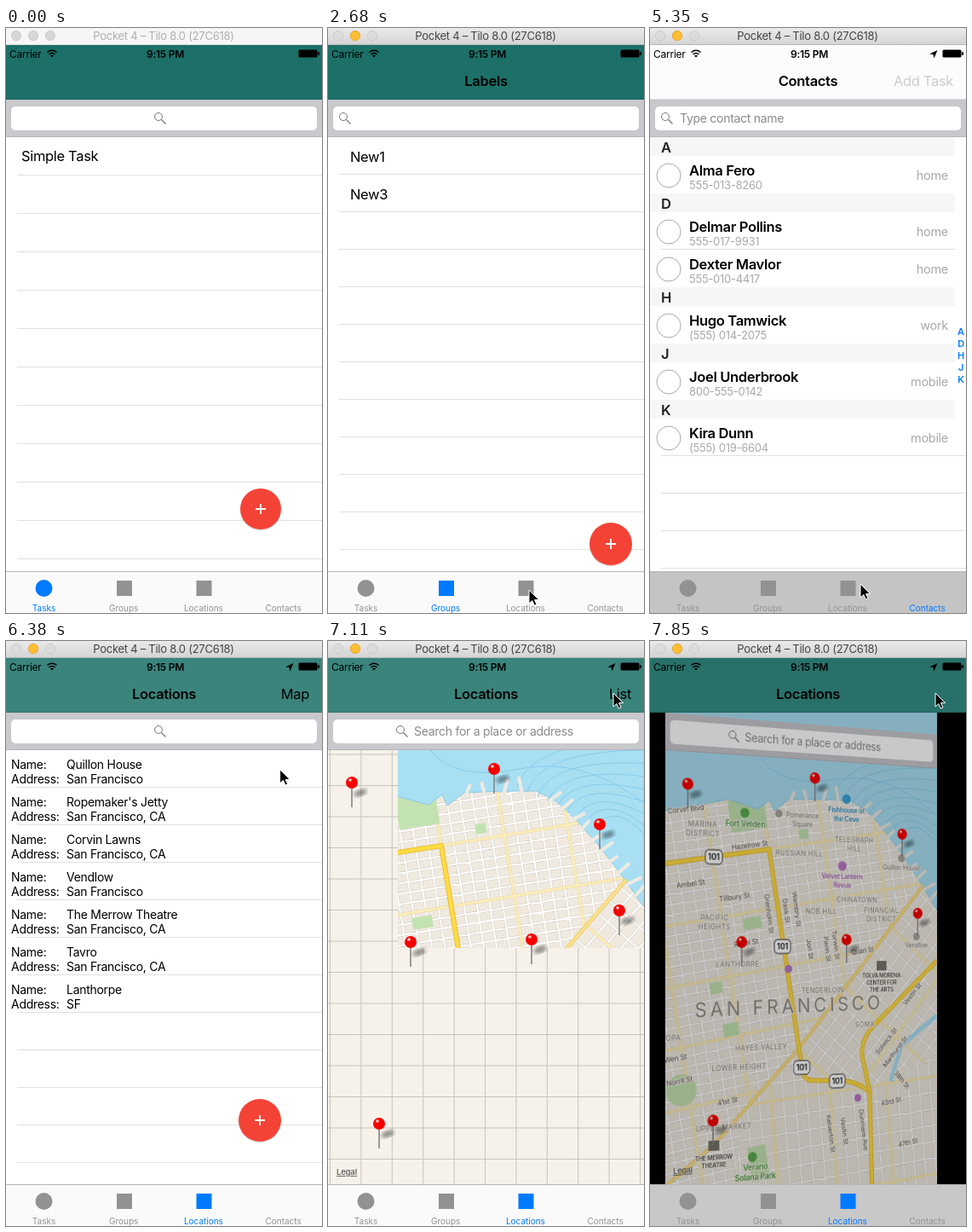
These frames come from a looping animation (371x686 px, 7990 ms). An HTML page:

```html
<!DOCTYPE html>
<html lang="en">
<head>
<meta charset="utf-8">
<title>Task app walkthrough</title>
<style>
  html, body { margin: 0; width: 100%; height: 100%; overflow: hidden; background: #000; }
  svg { position: absolute; left: 0; top: 0; width: 371px; height: 686px; transform-origin: 185.5px 353px; }
  text { font-family: Inter, "Open Sans", sans-serif; letter-spacing: -.02em; white-space: pre; }
</style>
</head>
<body>
<script>
const W = 371, H = 686, LOOP = 7990, TICK = 148;
const BLUE = '#007aff', GREY = '#929292';

const times = (n, f) => Array.from({ length: n }, (_, i) => f(i)).join('');
const rect = (x, y, w, h, fill, extra = '') =>
  `<rect x="${x}" y="${y}" width="${w}" height="${h}" fill="${fill}" ${extra}/>`;
const circle = (x, y, r, fill, extra = '') => `<circle cx="${x}" cy="${y}" r="${r}" fill="${fill}" ${extra}/>`;
const line = (d, color, width = 1, extra = '') =>
  `<path d="${d}" fill="none" stroke="${color}" stroke-width="${width}" ${extra}/>`;
const text = (s, x, y, size = 16.5, fill = '#000', extra = '') =>
  `<text x="${x}" y="${y}" font-size="${size}" fill="${fill}" ${extra}>${s}</text>`;
const BOLD = 'font-weight="600"', MID = 'text-anchor="middle"', END = 'text-anchor="end"';

// ---- shared parts ----
const rules = (first, step, n) =>
  times(n, i => rect(13, first + i * step, W - 13, 1, '#e0e0e2'));

const searchBar = (iconX, hint = '', hintX = 0) =>
  rect(0, 84, W, 44, '#c8c8cd') + rect(0, 127, W, 1, '#b4b4b9') + rect(6, 92, 359, 28, '#fff', 'rx="5"') +
  circle(iconX - 2, 104, 4.5, 'none', 'stroke="#77777c"') +
  line(`M${iconX + 1.5} 107.5l5 5`, '#77777c', 1.3) +
  text(hint, hintX, 111, 14, '#8a8a8f');

const addButton = (x, y, r) =>
  circle(x, y + 1.5, r, '#000', 'opacity=".12"') + circle(x, y, r, '#f44336') +
  line(`M${x - 6} ${y}h12M${x} ${y - 6}v12`, '#fff', 1.8);

// ---- list pages ----
const tasksPage = rect(0, 0, W, H, '#fff') + rules(172, 45, 11) + searchBar(181) +
  text('Simple Task', 18, 156) + addButton(299, 564, 24);

const groupsPage = rect(0, 0, W, H, '#fff') + rules(171, 44, 11) + searchBar(20) +
  text('New1', 26, 157) + text('New3', 26, 201) + addButton(332, 605, 25);

const places = [
  ['Quillon House', 'San Francisco'], ["Ropemaker's Jetty", 'San Francisco, CA'],
  ['Corvin Lawns', 'San Francisco, CA'], ['Vendlow', 'San Francisco'],
  ['The Merrow Theatre', 'San Francisco, CA'], ['Tavro', 'San Francisco, CA'], ['Lanthorpe', 'SF']
];
const locationsPage = rect(0, 0, W, H, '#fff') + rules(171, 44, 11) + searchBar(181) +
  places.map(([name, address], i) => {
    const y = 150 + i * 44;
    return text('Name:', 6, y, 14) + text(name, 71, y, 14) +
      text('Address:', 6, y + 17, 14) + text(address, 71, y + 17, 14);
  }).join('') + addButton(298, 562, 25);

const contacts = [
  ['Alma Fero', '555-013-8260', 'home'], ['Delmar Pollins', '555-017-9931', 'home'],
  ['Dexter Mavlor', '555-010-4417', 'home'], ['Hugo Tamwick', '(555) 014-2075', 'work'],
  ['Joel Underbrook', '800-555-0142', 'mobile'], ['Kira Dunn', '(555) 019-6604', 'mobile']
];
function contactRows() {
  let y = 128, letter = '', out = '';
  for (const [name, phone, kind] of contacts) {
    if (name[0] !== letter) {
      letter = name[0];
      out += rect(0, y, 358, 22, '#f6f6f6') + text(letter, 13, y + 18, 16.5, '#222', BOLD);
      y += 22;
    } else out += rect(13, y - 1, 345, 1, '#dcdcde');
    out += circle(22, y + 23, 14, '#fff', 'stroke="#a8a8a8"') + text(name, 46, y + 23, 16.5, '#000', BOLD) +
      text(phone, 46, y + 39, 13, '#a9a9a9') + text(kind, 350, y + 28, 14.5, '#a9a9a9', END);
    y += 44;
  }
  return out;
}
const contactsPage = rect(0, 0, W, H, '#fff') + rules(501, 44, 4) +
  searchBar(20, 'Type contact name', 35) + contactRows() +
  [...'ADHJK'].map((c, i) => text(c, 365, 360 + i * 14, 11, BLUE, MID + BOLD.padStart(20))).join('');

// ---- map page ----
const streets = (x, y, angle, dx, dy) => {
  const d = times(60, i => `M${(i - 30) * dx} -420V420`) + times(70, i => `M-420 ${(i - 35) * dy}H420`);
  const main = times(9, i => `M${(i - 4) * dx * 5} -420V420M-420 ${(i - 4) * dy * 6}H420`);
  return `<g transform="translate(${x} ${y}) rotate(${angle})">` +
    line(d, '#d8d2c8', 3.2) + line(d, '#fff', 2) + line(main, '#e6d9a8', 3.6) + line(main, '#fdedb8', 2.6) + '</g>';
};
const park = (x, y, w, h) => rect(x, y, w, h, '#c3e2b1', `transform="rotate(-9 ${x} ${y})"`);
const highway = d => line(d, '#e3b62f', 6, 'stroke-linejoin="round"') + line(d, '#ffdb43', 4.4, 'stroke-linejoin="round"');
const shield = (x, y) => rect(x - 11, y - 8, 22, 17, '#fff', 'rx="5" stroke="#666" stroke-width="1.3"') +
  text('101', x, y + 4, 10, '#333', MID + ' font-weight="700"');

const coast = 'M0 20V199L80 182L118 192L134 180L140 193L160 178L205 176L245 176L268 188L290 208L318 240L345 275L371 312V20Z';
const piers = times(10, i => `M${262 + i * 11} ${186 + i * 12.5}l${12 + i % 3 * 3} -${9 + i % 2 * 4}`) +
  times(4, i => `M${162 + i * 22} 180l${i % 2 ? -4 : 5} -${12 + i * 3}`);
const ferries = times(9, i => `M${222 + i * 12} ${172 + i * 5}Q${236 + i * 14} ${118 + i * 9} 380 ${112 + i * 16}`) +
  'M120 128Q150 165 225 150T371 190';
const market = 'M350 280L172 485L62 594L0 640';

const mapTile = `
  <clipPath id="soma"><path d="M350 280L172 485L185 524L262 540L371 500V300Z"/></clipPath>
  <clipPath id="south"><path d="M100 560L172 485L185 524L262 540L371 500V686H80Z"/></clipPath>
  ${rect(0, 20, W, H, '#efe9df')}${streets(133, 240, -9.3, 15, 12)}
  <g clip-path="url(#south)">${rect(0, 400, W, 286, '#efe9df')}${streets(216, 540, -5, 16, 21)}</g>
  <g clip-path="url(#soma)">${rect(0, 200, W, 400, '#efe9df')}${streets(172, 485, -49, 20, 16)}</g>
  ${park(78, 184, 48, 38)}${park(172, 215, 13, 12)}${park(98, 325, 24, 14)}${park(72, 452, 20, 16)}
  ${park(104, 602, 24, 42)}${park(55, 402, 16, 14)}${circle(20, 528, 19, '#c3e2b1')}
  <path d="${coast}" fill="#a9dff3" stroke="#8ccbe2"/>
  ${line(ferries, '#82cbea', .9)}${line(piers, '#efeae2', 4)}
  ${line('M371 448L318 485L302 530', '#a9dff3', 6)}
  ${line(market, '#e3c561', 4.6)}${line(market, '#fde08a', 3.4)}
  ${highway('M0 261L133 240L177 507Q180 524 190 524L226 526Q254 527 272 543L276 686')}
  ${highway('M371 377L275 461Q257 480 262 500L272 543')}`;

const labelGroup = (labels, size, color, angle = 0, extra = '') => labels.map(([s, x, y]) =>
  s.split('|').map((part, i) => text(part, x, y + i * (size + 2), size, color,
    `${MID} paint-order="stroke" stroke="#f5f1ea" stroke-width="2" transform="rotate(${angle} ${x} ${y})" ${extra}`)).join('')).join('');

const mapLabels =
  labelGroup([['SAN FRANCISCO', 164, 440]], 24, '#8d8983', -1, 'style="letter-spacing:4.5px"') +
  labelGroup([['MARINA|DISTRICT', 47, 216], ['TELEGRAPH|HILL', 250, 228], ['RUSSIAN HILL', 174, 247],
    ['CHINATOWN', 254, 303], ['NOB HILL', 204, 318], ['FINANCIAL|DISTRICT', 289, 316], ['PACIFIC|HEIGHTS', 62, 327],
    ['LANTHORPE', 92, 383], ['TENDERLOIN', 206, 416], ['SOMA', 265, 460], ['HAYES VALLEY', 123, 484],
    ['LOWER HEIGHT', 94, 507], ['UPPER MARKET', 74, 578], ['OPA', 10, 469]], 8.6, '#8b867e', 0, 'style="letter-spacing:.5px"') +
  labelGroup([['Corvin Blvd', 26, 199], ['Hazelrow St', 108, 239], ['Ambel St', 32, 287], ['Tillbury St', 88, 302],
    ['Ravel St', 103, 357], ['Quarl St', 262, 367], ['Wen St', 13, 493], ['Norrit St', 18, 520],
    ['41st St', 79, 547], ['43rd St', 303, 559], ['47th St', 328, 613]], 8.8, '#5a564f', -8) +
  labelGroup([['Grenholm St', 130, 319], ['Dask St', 153, 315], ['Wembry St', 167, 313], ['Jorl St', 185, 362],
    ['Pavin St', 209, 362], ['Torwin St', 221, 357], ['Kelverton St', 214, 592], ['Vestin St', 233, 590],
    ['Dunmere Ave', 260, 590]], 8.6, '#5a564f', 82) +
  labelGroup([['Vestin St', 336, 422], ['Solwick St', 298, 481], ['Marlhurst St', 311, 495]], 8.8, '#5a564f', -48) +
  labelGroup([['38th St', 316, 531]], 8.8, '#5a564f', 48) +
  labelGroup([['Fort Velden', 102, 214], ['Verano|Solana Park', 115, 629]], 9.8, '#4f9a45', 0, BOLD) +
  labelGroup([['Fishhouse of|the Cove', 239, 191]], 8.6, '#2f8fc0', 0, BOLD) +
  labelGroup([['Velvet Lantern|Revue', 233, 274]], 8.6, '#a765b5', 0, BOLD) +
  labelGroup([['Pomerance|Square', 178, 200], ['Quillon House', 318, 261], ['Vendlow', 340, 360]], 8.6, '#85807a') +
  labelGroup([['TOLVA MORENA|CENTER FOR|THE ARTS', 289, 398], ['THE MERROW|THEATRE', 61, 613]], 7.2, '#55514b', 0, BOLD) +
  shield(61, 251) + shield(151, 358) + shield(177, 507) + shield(226, 526) +
  circle(101, 197, 6, '#5aab4c') + circle(111, 613, 6, '#5aab4c') + circle(239, 174, 6, '#38a5d8') +
  circle(233, 258, 6, '#b878c6') + circle(159, 386, 5, '#b878c6') + circle(255, 549, 5, '#b878c6') +
  circle(146, 196, 5, '#aaa59d') + circle(318, 246, 5, '#aaa59d') + circle(340, 346, 5, '#aaa59d') +
  rect(282, 377, 14, 12, '#77716a') + rect(54, 590, 14, 12, '#77716a');

const pin = ([x, y]) =>
  `<ellipse cx="${x + 10}" cy="${y + 12}" rx="8" ry="4" fill="#000" opacity=".4" filter="url(#soft)" transform="rotate(-20 ${x + 10} ${y + 12})"/>` +
  line(`M${x} ${y + 6}v23`, '#858585', 1.6) + circle(x, y, 7, '#f60000') + circle(x - 2, y - 3, 1.8, '#ffd0d0');

const mapPage = `
  <filter id="soft"><feGaussianBlur stdDeviation="2"/></filter>
  <clipPath id="loaded"><rect id="loadedArea"/></clipPath>
  ${rect(0, 0, W, H, '#f6f2ea')}
  ${line(times(11, i => `M${2.5 + i * 36.4} 20V686`) + times(16, i => `M0 ${133 + i * 36.5}H371`), '#c6c3bd')}
  <g clip-path="url(#loaded)">${mapTile}</g><g id="labels">${mapLabels}</g>
  ${searchBar(87, 'Search for a place or address', 101)}
  ${[[28, 166], [195, 150], [319, 215], [342, 316], [97, 353], [239, 350], [60, 566]].map(pin).join('')}
  ${text('Legal', 10, 626, 9.5, '#666', BOLD + ' text-decoration="underline"')}`;

// ---- window frame, bars and pointer ----
const statusBar = located =>
  text('Carrier', 4, 34.5, 12) + text('9:15 PM', 187, 34.5, 12, '#000', MID + ' ' + BOLD) +
  line('M48.5 28.5q5.5 -4.5 11 0M50.5 31q3.5 -3 7 0', '#000', 1.6) + '<path d="M52 32.5q2 -1.5 4 0l-2 2z"/>' +
  (located ? '<path d="M328 30.5L337.5 26L333.5 35.5L332.5 31Z"/>' : '') +
  rect(343.5, 25.5, 22, 9, '#000', 'rx="1.5"') + rect(366, 28, 2, 4, '#000', 'rx="1"');

const titleBar = active =>
  `<linearGradient id="chrome" x2="0" y2="1"><stop stop-color="#eaeaea"/><stop offset="1" stop-color="#d3d3d3"/></linearGradient>` +
  rect(0, 0, W, 20, active ? 'url(#chrome)' : '#f6f6f6') + rect(0, 19, W, 1, active ? '#b8b8b8' : '#dcdcdc') +
  times(3, i => circle(12 + i * 20, 9, 5.7, active ? (i === 1 ? '#fdbe33' : '#dcdcdc') : '#d6d6d6',
    `stroke="${active && i === 1 ? '#e0a02c' : '#c8c8c8'}" stroke-width=".8"`)) +
  text('Pocket 4 – Tilo 8.0 (27C618)', 185, 14, 13, active ? '#444' : '#b0b0b0', MID);

const tabBar = (selected, fill) => {
  const color = i => i === selected ? BLUE : GREY;
  return rect(0, 637, W, 49, fill) + rect(0, 637, W, 1, '#b5b5b5') +
    circle(44.5, 657, 10, color(0)) + rect(130, 648, 18, 18, color(1)) + rect(223.5, 648, 18, 18, color(2)) +
    ['Tasks', 'Groups', 'Locations', 'Contacts'].map((name, i) =>
      text(name, 44.5 + i * 93.7, 683.5, 10, color(i), MID + ' style="letter-spacing:0"')).join('');
};

const pointer = ([x, y]) =>
  `<path d="M0 0V16L3.8 12.6L6.4 18.2L9 17L6.5 11.6H11.6Z" transform="translate(${x} ${y})" stroke="#fff" stroke-width="1"/>`;

// ---- timeline ----
const pages = [tasksPage, groupsPage, locationsPage, contactsPage, mapPage, ''].map(content => {
  document.body.insertAdjacentHTML('beforeend', `<svg viewBox="0 0 ${W} ${H}">${content}</svg>`);
  return document.body.lastElementChild;
});
const bars = pages.pop();
const MAP = 4, titles = ['', 'Labels', 'Locations', 'Contacts'];

// Keys are [time, ...values], eased between neighbours.
function at(keys, t) {
  const i = keys.findIndex(k => k[0] > t);
  if (i < 0) return keys.at(-1).slice(1);
  if (!i) return keys[0].slice(1);
  const [a, b] = [keys[i - 1], keys[i]], p = (t - a[0]) / (b[0] - a[0]), e = p * p * (3 - 2 * p);
  return a.slice(1).map((v, j) => v + (b[j + 1] - v) * e);
}
const pointerKeys = [[1060, 124, 661], [1200, 126, 652], [2380, 126, 652], [2680, 236, 659], [3130, 236, 659],
  [3560, 332, 669], [3860, 331, 667], [4600, 331, 667], [5340, 247, 652], [5500, 247, 652], [6670, 335, 61]];
const flipKeys = [[6680, 0], [6826, 48.2], [6974, 140], [7110, 180], [7720, 180], [7862, 205.4]];
const tabKeys = [[0, 0], [1780, 1], [2800, 2], [4455, 3], [5485, 2]];

function render(t) {
  const tab = tabKeys.findLast(k => k[0] <= t)[1];
  const [flip] = at(flipKeys, t), onMap = flip > 90;
  const angle = onMap ? flip - 180 : flip, flipping = Math.abs(angle) > .1;
  const shown = onMap ? MAP : tab;

  pages.forEach((page, i) => page.style.display = i === shown ? '' : 'none');
  // The nearer edge stays in the screen plane while the page turns.
  const depth = W / 2 * Math.abs(Math.sin(angle * Math.PI / 180));
  pages[shown].style.transform = flipping ? `perspective(1508px) translateZ(${-depth}px) rotateY(${angle}deg)` : '';
  pages[shown].style.filter = flipping ? `brightness(${1 - .0085 * Math.abs(angle)})` : '';

  const loaded = t > 7250, area = t < 7100 ? [0, 0, 0, 0] : loaded ? [0, 20, W, H] : [82, 128, 289, 232];
  ['x', 'y', 'width', 'height'].forEach((name, i) => loadedArea.setAttribute(name, area[i]));
  labels.style.display = loaded ? '' : 'none';

  const navFill = tab === 3 ? '#fcfcfc' : flipping ? '#28716a' : tab === 2 ? '#3a847c' : '#1c7067';
  const button = tab === 3 ? 'Add Task' : tab === 2 && !flipping ? (onMap ? 'List' : 'Map') : '';
  bars.innerHTML = rect(0, 20, W, 64, navFill) + rect(0, 83.5, W, .5, '#0004') + titleBar(t > 1640) + statusBar(t > 2800) +
    text(titles[tab], 185.5, 68, 16.5, '#000', MID + ' ' + BOLD) +
    text(button, 356, 68, 16.5, tab === 3 ? '#ccc' : '#000', END) +
    tabBar(tab, tab === 3 ? '#c4c4c4' : flipping ? '#c8c8c8' : '#fafafa') +
    (t > 1050 ? pointer(at(pointerKeys, t)) : '');
}

let lastStep = null;
function frame() {
  const step = Math.max(0, Math.floor((performance.now() % LOOP - 5) / TICK));
  if (step !== lastStep) render((lastStep = step) * TICK + 18);
  requestAnimationFrame(frame);
}
frame();
</script>
</body>
</html>
```
